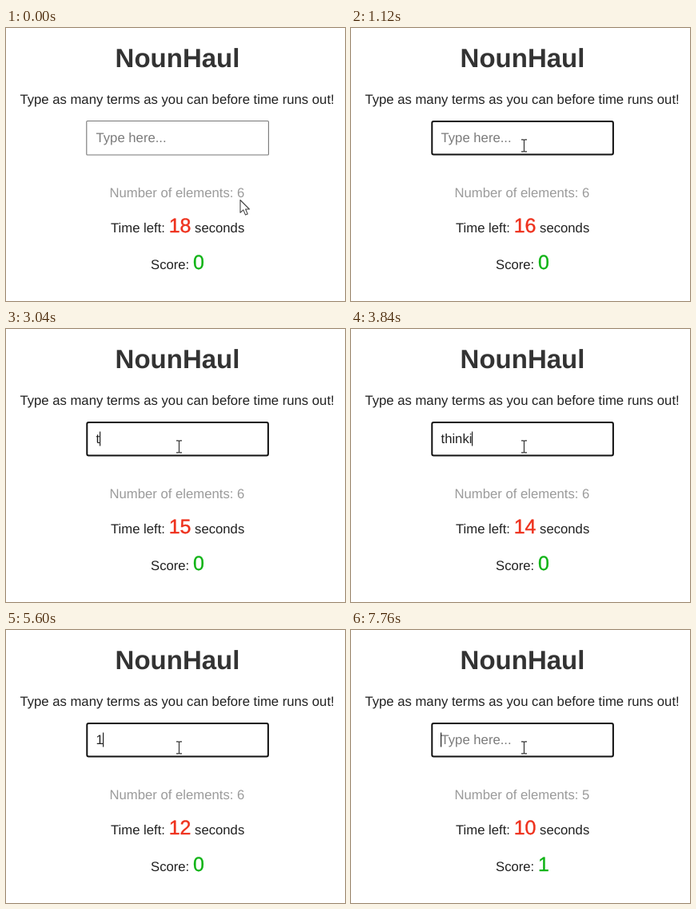
An HTML page for the animation above (8 s loop, 424 by 342 pixels).

```html
<!DOCTYPE html>
<html lang="en">
<head>
<meta charset="utf-8">
<title>NounHaul</title>
<style>
  html, body { margin: 0; width: 100%; height: 100%; overflow: hidden; background: #fff; }
  svg { display: block; width: 424px; height: 342px; }
  text {
    font: 16.7px "Liberation Sans", Arial, sans-serif;
    fill: #222;
    white-space: pre;
    text-rendering: geometricPrecision;
  }
  .title { font-size: 33px; font-weight: bold; fill: #333; text-anchor: middle; }
  .muted { fill: #9b9b9b; }
  .hint { fill: #7c7c7c; }
  .big { font-size: 25px; stroke-width: .4px; }
  .time { fill: #ee311d; stroke: #ee311d; }
  .score { fill: #0fb315; stroke: #0fb315; }
  #box { fill: #fff; stroke: #777; stroke-width: 1.1px; }
  #box.focus { stroke: #111; stroke-width: 2px; }
</style>
</head>
<body>
<svg viewBox="0 0 424 342">
  <text class="title" x="214.5" y="49.1">NounHaul</text>
  <text x="17.4" y="94.7">Type as many terms as you can before time runs out!</text>

  <rect id="box"/>
  <text id="field" x="112.5" y="142.8"></text>
  <rect id="caret" y="128.5" width="1.2" height="18" fill="#222"/>

  <text class="muted" x="129.5" y="211.8">Number of elements: <tspan id="count"></tspan></text>
  <text x="131" y="255.6">Time left: <tspan id="time" class="big time"></tspan> seconds</text>
  <text x="181" y="301.6">Score: <tspan id="score" class="big score"></tspan></text>

  <path id="arrow" d="M0 0V15.8L3.8 12.4L6.5 18.6L9.2 17.4L6.6 11.5H11.4Z"
        fill="#fff" stroke="#444" stroke-width="1.1" stroke-linejoin="round"/>
  <path id="beam" d="M-3.5 -7.5H-1Q0 -7.5 0 -6.5Q0 -7.5 1 -7.5H3.5M0 -6.5V6.5M-3.5 7.5H-1Q0 7.5 0 6.5Q0 7.5 1 7.5H3.5"
        transform="translate(216.5 147.4)" fill="none" stroke="#333" stroke-width="1.2"/>
</svg>
<script>
  const LOOP = 8000;
  const FOCUS_AT = 400;
  const SCORE_AT = 6160;
  const FIELD_X = 112.5;
  const BOX = { x: 100.3, y: 116, width: 228.6, height: 43.5 };

  // [start time, value]
  const typing = [
    [0, ""], [1520, "h"], [1680, "hm"], [1840, "hmm"], [2080, ""],
    [3040, "t"], [3120, "th"], [3280, "thi"], [3440, "thin"], [3520, "think"],
    [3840, "thinki"], [4000, "thinkin"], [4080, "thinking"], [4240, ""],
    [5600, "1"], [SCORE_AT, ""]
  ];
  const seconds = [
    [0, 18], [80, 17], [1120, 16], [2080, 15], [3120, 14],
    [4080, 13], [5120, 12], [6160, 11], [7120, 10]
  ];
  const caretOn = [
    [0, false], [FOCUS_AT, true], [960, false], [1520, true], [2400, false],
    [2880, true], [4640, false], [5120, true], [SCORE_AT, false],
    [6720, true], [7200, false], [7760, true]
  ];
  const pointer = [[0, [293, 215.5]], [80, [277, 200]], [160, [238, 166]], [240, null]];

  const $ = id => document.getElementById(id);
  const at = (steps, t) => steps.findLast(([start]) => start <= t)[1];
  const show = (el, on) => el.setAttribute("visibility", on ? "visible" : "hidden");
  const setText = (el, value) => {
    if (el.textContent !== String(value)) el.textContent = value;
  };

  function drawBox(focused) {
    const inset = focused ? 1 : 0.5;
    const box = $("box");
    box.classList.toggle("focus", focused);
    const shape = {
      x: BOX.x + inset,
      y: BOX.y + inset,
      width: BOX.width - 2 * inset,
      height: BOX.height - 2 * inset,
      rx: 2 * inset
    };
    for (const name in shape) box.setAttribute(name, shape[name]);
  }

  function drawField(t) {
    const value = at(typing, t);
    const field = $("field");
    setText(field, value || "Type here...");
    field.classList.toggle("hint", !value);
    const width = value ? field.getComputedTextLength() : 0;
    $("caret").setAttribute("x", Math.floor(FIELD_X + width));
    show($("caret"), at(caretOn, t));
  }

  function drawPointer(t) {
    const tip = at(pointer, t);
    show($("arrow"), tip);
    show($("beam"), !tip);
    if (tip) $("arrow").setAttribute("transform", `translate(${tip})`);
  }

  function draw(now) {
    const t = now % LOOP;
    const won = t >= SCORE_AT;
    drawBox(t >= FOCUS_AT);
    drawField(t);
    drawPointer(t);
    setText($("count"), won ? 5 : 6);
    setText($("time"), at(seconds, t));
    setText($("score"), won ? 1 : 0);
  }

  let origin;
  function tick(now) {
    origin ??= now;
    draw(now - origin);
    requestAnimationFrame(tick);
  }
  draw(0);
  requestAnimationFrame(tick);
</script>
</body>
</html>
```
